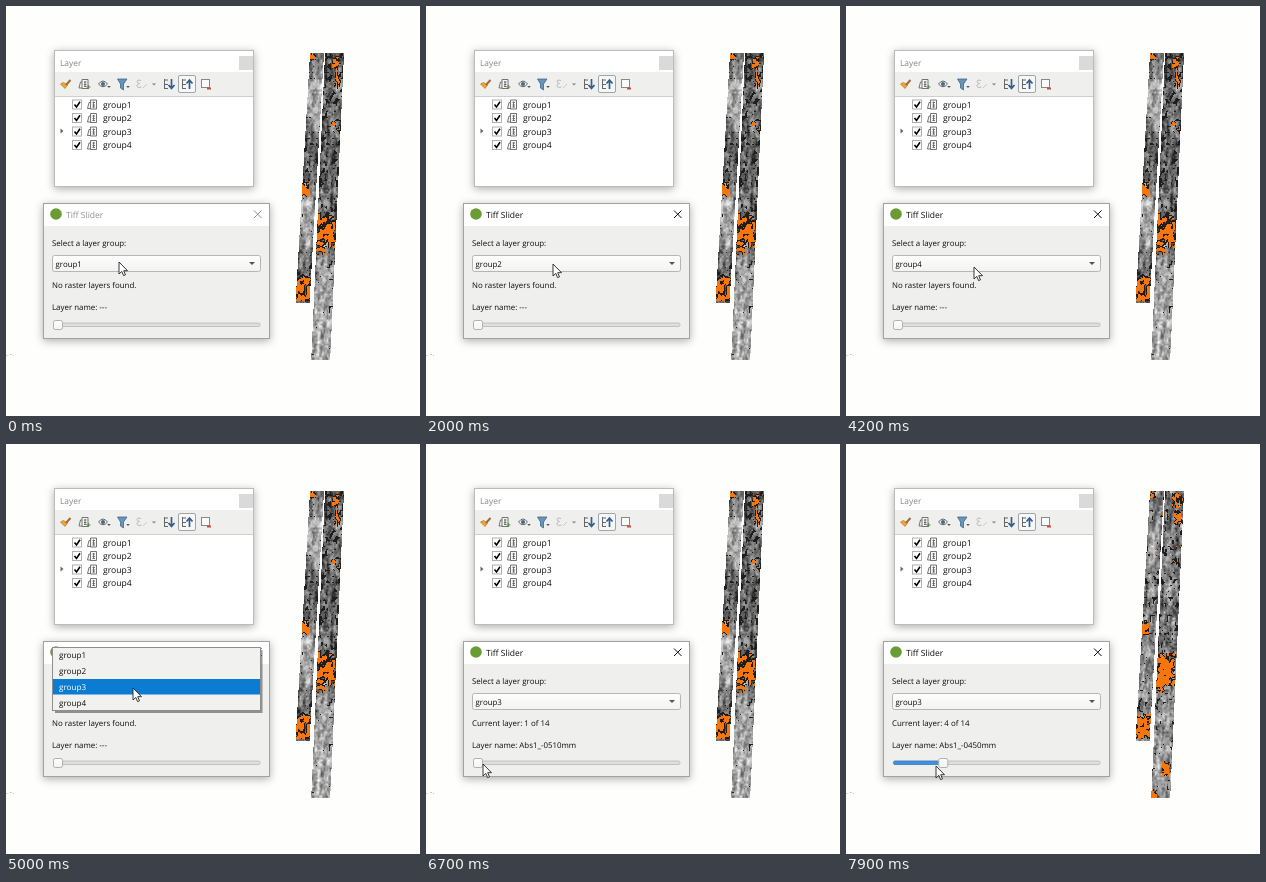
Animation of 414x410 px, one loop 8000 ms. Source, as an HTML page with a canvas:

```html
<!DOCTYPE html>
<html lang="en">
<head>
<meta charset="utf-8">
<title>Tiff Slider</title>
<style>
  html, body { margin: 0; width: 100%; height: 100%; overflow: hidden; background: #fefefc; }
  svg, canvas { position: absolute; left: 0; top: 0; display: block; }
  text { font-family: "Open Sans", "Noto Sans", sans-serif; font-size: 7.9px; fill: #0c0c0c; white-space: pre; text-rendering: geometricPrecision; }
  .list text { font-size: 8.6px; }
</style>
</head>
<body>
<canvas id="raster" width="414" height="410"></canvas>
<svg id="stage" width="414" height="410" viewBox="0 0 414 410">
  <defs>
    <filter id="shade" x="-15%" y="-15%" width="130%" height="135%">
      <feDropShadow dx="0" dy="2" stdDeviation="4" flood-color="#000" flood-opacity=".32"/>
    </filter>
    <linearGradient id="face" x1="0" y1="0" x2="0" y2="1">
      <stop offset="0" stop-color="#fefefe"/><stop offset="1" stop-color="#f3f3f2"/>
    </linearGradient>
    <g id="sheets" fill="#f6f6f6" stroke="#666" stroke-width=".9">
      <path d="M-5 4L-3.500-2H1L0 4Z"/><path d="M-2 4.500V-4.500H4V4.500Z"/>
      <path d="M0-2H2.500M0 .5H2.500M0 2.500H2.500M1-3V3"/>
    </g>
    <path id="drop" d="M-3-1.500H3L0 1.500Z" fill="#555"/>
  </defs>

  <g fill="#c9c9c6"><rect y="349" width="1.500" height="1"/><rect x="4" y="348" width="2" height="1"/><rect x="7" y="349" width="1" height="1"/></g>

  <g id="panel">
    <rect x="48.500" y="44.500" width="199" height="136" fill="#fff" stroke="#bcbcba" filter="url(#shade)"/>
    <text x="54" y="59.500" style="font-size:8.4px;fill:#858585">Layer</text>
    <rect x="233" y="50" width="14" height="14" fill="#dadada"/>
    <rect x="49" y="66" width="198" height="24" fill="#efefee"/>
    <path d="M49 90.500H247" stroke="#cfcfcd"/>
    <g fill="none" stroke="#666">
      <path d="M54.500 78L59 82.500L61.500 79L57.500 76.500Z" fill="#f0a52b" stroke="#b9791a" stroke-width=".7"/>
      <path d="M60 79L64.500 74" stroke="#a06a35" stroke-width="2"/>
      <use href="#sheets" x="78" y="78"/>
      <path d="M80.500 81H84.500M82.500 79V83" stroke="#5c8f50" stroke-width="1.200"/>
      <path d="M92.500 78Q97 72 101.500 78Q97 83.500 92.500 78Z" fill="#f2f2f2"/>
      <circle cx="97" cy="78" r="2.100" fill="#4a6988" stroke="none"/>
      <path d="M111.500 73H121L117.500 78V84L114.500 82V78Z" fill="#6794b8" stroke="#41698a" stroke-width=".8"/>
      <path d="M135 74.500Q131 73 131 75.500Q131.500 77.500 133.500 77.500Q130.500 78 131 80.500Q132 82.500 135.500 81" stroke="#bbb"/>
      <path d="M137 82L141 78" stroke="#c9c9c9"/>
      <path d="M158.500 73V83M158.500 74H162M158.500 78.500H162M158.500 82.500H162" stroke="#666"/>
      <path d="M165.500 73V81M162.500 79L165.500 82.500L168.500 79" stroke="#315f8b" stroke-width="1.700"/>
      <rect x="172.500" y="69.500" width="17" height="17" rx="1.500" fill="#f6f7f8" stroke="#a2a5a8"/>
      <path d="M176.500 73V83M176.500 74H180M176.500 78.500H180M176.500 82.500H180" stroke="#666"/>
      <path d="M183.500 83V75M180.500 77.500L183.500 74L186.500 77.500" stroke="#315f8b" stroke-width="1.700"/>
      <rect x="195.500" y="73.500" width="8" height="8" fill="#fafafa" stroke="#888"/>
      <path d="M201 82.500H205" stroke="#cc4a40" stroke-width="2"/>
    </g>
    <use href="#drop" transform="translate(103 81) scale(.6)"/>
    <use href="#drop" transform="translate(122 81) scale(.6)"/>
    <use href="#drop" transform="translate(148 78.500) scale(.7)" opacity=".7"/>
    <g id="tree" class="list"></g>
    <path d="M54.500 122.500L57.500 125L54.500 127.500Z" fill="#666"/>
  </g>

  <g id="dialog">
    <rect x="37.500" y="197.500" width="226" height="135" fill="#efefed" stroke="#a2a2a0" filter="url(#shade)"/>
    <rect x="38" y="198" width="225" height="22" fill="#fff"/>
    <circle cx="50" cy="208" r="5.800" fill="#6a9c35"/>
    <text id="title" x="60" y="211.500" style="font-size:8.5px">Tiff Slider</text>
    <path id="close" d="M248 204.500L255.500 212M255.500 204.500L248 212" stroke-width="1"/>
    <text x="46" y="240">Select a layer group:</text>
    <rect x="46.500" y="249.500" width="208" height="16" rx="2" fill="url(#face)" stroke="#b6b6b4"/>
    <text id="choice" x="49.500" y="261"></text>
    <use href="#drop" x="246" y="257.500"/>
    <text id="status" x="46" y="282"></text>
    <text id="name" x="46" y="303.500"></text>
    <rect x="47.500" y="317" width="206.500" height="3.500" rx="1.500" fill="#dededc" stroke="#b8b8b6" stroke-width=".8"/>
    <rect id="fill" x="47.500" y="317" height="3.500" rx="1.500" fill="#3d92e0" stroke="#2c75bb" stroke-width=".6"/>
    <rect id="handle" y="314.500" width="9" height="9" rx="1.800" fill="url(#face)" stroke="#b0b0ae"/>
  </g>

  <g id="popup">
    <rect x="49" y="3" width="207.500" height="63" fill="#000" opacity=".4"/>
    <rect x="46.500" y=".5" width="208" height="63" fill="#f1f1f0" stroke="#8e8e8e"/>
    <rect id="hover" x="47" width="207" height="15.500" fill="#0c7bd2"/>
    <g id="items"></g>
  </g>

  <path id="cursor" d="M0 0V12L2.800 9.400L4.600 13.600L6.500 12.800L4.700 8.700H8.500Z" fill="#fff" stroke="#222" stroke-width=".9"/>
</svg>
<script>
const $ = id => document.getElementById(id);
const LOOP = 8000, ROW = 15.75, STEP = 15.1;
const groups = [1, 2, 3, 4].map(n => 'group' + n);

$('tree').innerHTML = groups.map((g, i) => {
  const y = 98.5 + i * 13.5;
  return `<rect x="66.500" y="${y - 4.5}" width="9" height="9" fill="#fff" stroke="#a8a8a8" stroke-width=".9"/>
    <path d="M68.500 ${y}L70.500 ${y + 2.5}L74 ${y - 2.7}" fill="none" stroke="#000" stroke-width="1.600"/>
    <use href="#sheets" x="86.500" y="${y}"/><text x="97" y="${y + 3.2}">${g}</text>`;
}).join('');
$('items').innerHTML = groups.map((g, i) =>
  `<text x="53" y="${11.3 + i * ROW}" style="font-size:8.1px">${g}</text>`).join('');
const items = [...$('items').children];

// Cursor tip: time, x, y
const path = [
  [0, 113, 256], [500, 113, 256], [1000, 125, 270], [1600, 125, 270], [2000, 127, 258],
  [2400, 127, 258], [2700, 127, 272], [3200, 127, 272], [3300, 127, 281], [3400, 127, 289],
  [3600, 127, 289], [4200, 128, 261], [4500, 128, 261], [5000, 127, 244], [5200, 127, 244],
  [6000, 62, 317], [6700, 57, 320], [7000, 53, 321], [7900, 90, 322], [LOOP, 90, 322]
];
// Popup: opens, closes, current row, picked row
const picks = [[300, 1200, 0, 1], [2200, 3600, 1, 3], [4300, 5200, 3, 2]];

function cursorAt(t) {
  const i = Math.max(1, path.findIndex(p => p[0] > t));
  const [t0, x0, y0] = path[i - 1], [t1, x1, y1] = path[i];
  const k = (t - t0) / (t1 - t0);
  return [x0 + (x1 - x0) * k, y0 + (y1 - y0) * k];
}

function hash(x, y, s) {
  const v = Math.sin(x * 127.1 + y * 311.7 + s * 74.7) * 43758.5453;
  return v - Math.floor(v);
}
function noise(x, y, s) {
  const i = Math.floor(x), j = Math.floor(y), a = x - i, b = y - j;
  const mix = (p, q, k) => p + (q - p) * k;
  return mix(mix(hash(i, j, s), hash(i + 1, j, s), a),
             mix(hash(i, j + 1, s), hash(i + 1, j + 1, s), a), b);
}

// Scan strips: top left x, width, lean, height, darkness along y (-1 to 1)
const strips = [
  { x: 303.5, w: 14, k: .058, h: 250, tone: y => Math.cos((y - 150) / 20) },
  { x: 318.5, w: 19, k: .045, h: 307, tone: y => Math.tanh((250 - y) / 20) }
];
// Hot spots: x, y, half width, half height, first layer
const spots = [
  [306, 50, 3, 3, 0], [329, 56, 3, 6, 0], [331, 73, 3, 6, 0], [327, 116, 2, 3, 0],
  [298, 183, 4, 6, 0], [314, 227, 4, 18, 0], [322, 225, 5, 14, 0], [296, 282, 7, 10, 0],
  [319, 324, 3, 6, 2], [307, 350, 3, 4, 2]
];

function pixel(x, y, u, s, layer) {
  const heat = Math.max(...spots.map(([a, b, p, q, from]) =>
    layer < from ? -9 : 1 - Math.max(Math.abs(x - a) / p, Math.abs(y - b) / q)));
  const grain = noise(x / 1.5, y / 2, layer + 3);
  const tone = s.tone(y) * (1 - layer * .2);
  if (heat > -.2) {
    const hot = heat * .4 + noise(x / 2.2, y / 3, layer + 8);
    if (hot > .56) return [246, 118, 14];
    if (hot > .36) return [34, 27, 22];
  }
  const speck = noise(u / 2, y / 3, layer + 5);
  if (y < 130 && u > s.w * .55 && speck > .9) return [226, 110, 22];
  const edge = Math.abs(u / s.w - .5) * 2;
  if (speck + edge * edge * .12 + tone * .13 > .86) return [30, 30, 30];
  const streak = noise(u / 2.2, y / 16, layer + 2);
  const soft = noise(u / 3, y / 6, layer + 1);
  const g = 142 - 32 * tone - 12 * edge
    + 100 * (soft - .5) + 80 * (streak - .5) + 80 * (grain - .5);
  return [g, g, g];
}

const ctx = $('raster').getContext('2d');
let shown = -1;
function drawRaster(layer) {
  if (layer === shown) return;
  shown = layer;
  const ox = 286, oy = 47, img = ctx.createImageData(54, 308);
  for (const s of strips)
    for (let j = 0; j < s.h; j++)
      for (let i = 0; i < 54; i++) {
        const u = ox + i - s.x + s.k * j;
        if (u >= 0 && u < s.w)
          img.data.set([...pixel(ox + i, oy + j, u, s, layer), 255], (j * 54 + i) * 4);
      }
  ctx.putImageData(img, ox, oy);
}

function put(id, attrs) {
  for (const k in attrs) $(id).setAttribute(k, attrs[k]);
}

function render(time) {
  const t = Math.floor(time / 100) * 100;
  const [x, y] = cursorAt(t);
  put('cursor', { transform: `translate(${x} ${y})` });

  const ink = t < 300 ? '#8f8f8f' : '#0c0c0c';
  $('title').style.fill = ink;
  put('close', { stroke: ink });

  const open = picks.find(p => t >= p[0] && t < p[1]);
  $('popup').style.display = open ? '' : 'none';
  if (open) {
    const top = Math.round(250 - open[2] * ROW);
    const row = Math.min(3, Math.max(0, Math.floor((y - top) / ROW)));
    put('popup', { transform: `translate(0 ${top})` });
    put('hover', { y: Math.round(.5 + row * ROW) });
    items.forEach((el, i) => { el.style.fill = i === row ? '#fff' : '#0c0c0c'; });
  }

  const current = picks.reduce((g, p) => t >= p[1] ? p[3] : g, 0);
  const loaded = current === 2;
  const layer = t > 7000 ? Math.max(0, Math.round((x - 52) / STEP)) : 0;
  $('choice').textContent = groups[current];
  $('status').textContent = loaded ? `Current layer: ${layer + 1} of 14` : 'No raster layers found.';
  $('name').textContent = 'Layer name: ' + (loaded ? `Abs1_-0${510 - layer * 20}mm` : '---');
  const hx = 52 + layer * STEP;
  put('handle', { x: hx - 4.5 });
  put('fill', { width: layer ? hx - 47.5 : 0 });
  drawRaster(layer);
}

const start = performance.now();
function tick() {
  render((performance.now() - start) % LOOP);
  requestAnimationFrame(tick);
}
tick();
</script>
</body>
</html>
```
